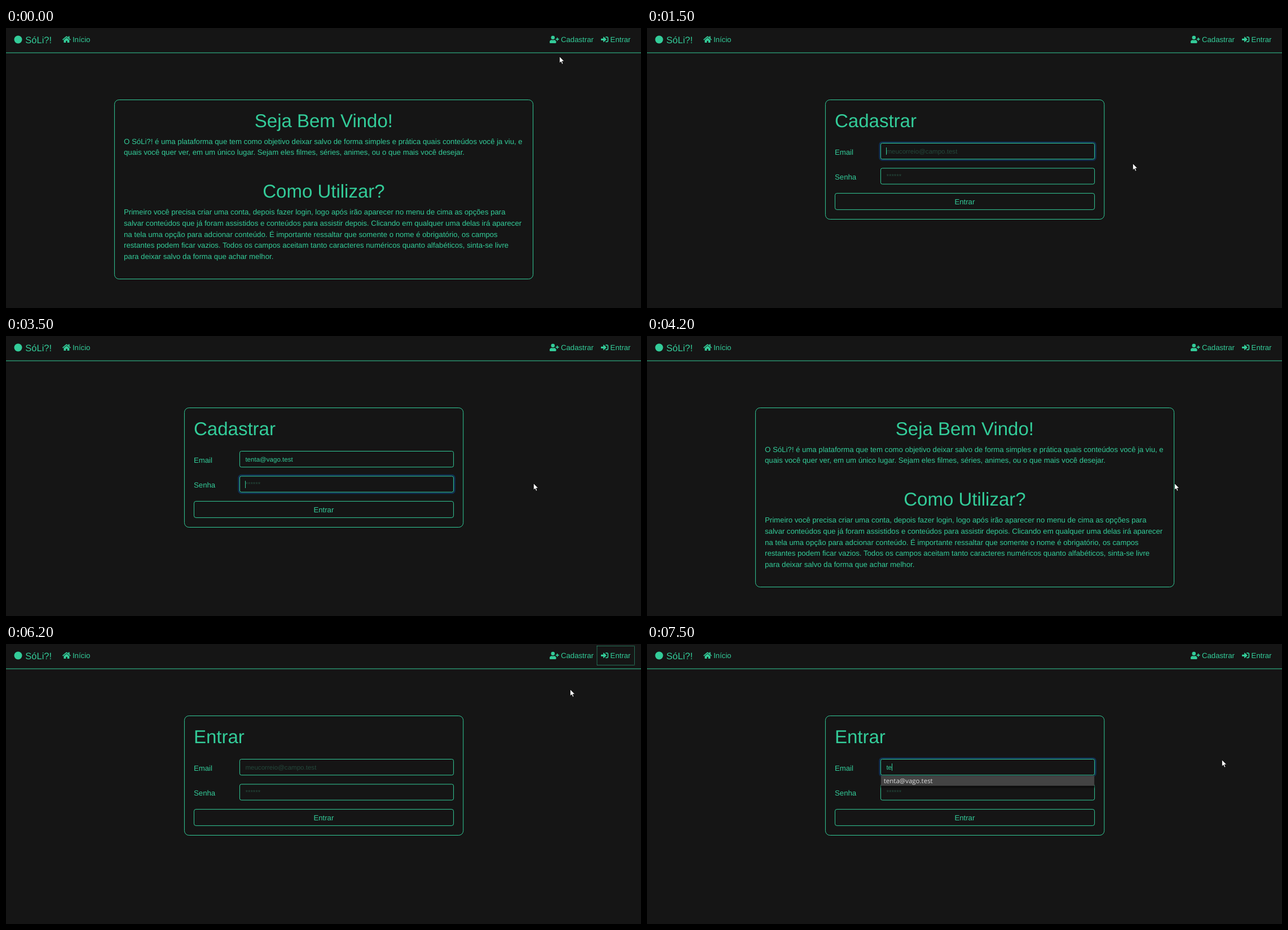
Recreate the animation shown at these times as an HTML page. Size 1126 by 497 pixels, loop 8 s.

```html
<!DOCTYPE html>
<html lang="pt-BR">
<head>
<meta charset="utf-8">
<title>SóLi?!</title>
<style>
  html, body { margin: 0; width: 100%; height: 100%; overflow: hidden; background: #151515; }
  svg { display: block; width: 1126px; height: 497px; }
  svg { font: 13.2px "Liberation Sans", Arial, sans-serif; text-rendering: geometricPrecision; }
  text { fill: #33cc99; white-space: pre; }
  .icon { fill: #33cc99; }
  .line { fill: none; stroke: #33cc99; stroke-width: 1; }
  .brand { font-size: 16.5px; }
  .h1 { font-size: 33px; }
  .mid { text-anchor: middle; }
  .field { font-size: 11.55px; }
  .hint { fill: #24483b; }
  .ui { font: 11.5px "Open Sans", "Noto Sans", sans-serif; }
  .glow { fill: none; stroke: rgb(0, 123, 255); stroke-opacity: .27; stroke-width: 2.6; }
  .caret { stroke: #33cc99; stroke-width: 1; }
  .dots { stroke-dasharray: 1 1; }
  .pointer { fill: #fff; stroke: #000; stroke-width: .8; stroke-linejoin: round; }
</style>
</head>
<body>
<svg viewBox="0 0 1126 497">
  <rect width="1126" height="497" fill="#151515"/>

  <g id="nav">
    <circle class="icon" cx="21.5" cy="20.5" r="7"/>
    <text class="brand" x="34.3" y="26.5">SóLi?!</text>
    <path class="icon" transform="translate(100 13.7) scale(.0258)" d="M280 148L96 300V464a16 16 0 0 0 16 16h112a16 16 0 0 0 16-16V368a16 16 0 0 1 16-16h64a16 16 0 0 1 16 16v96a16 16 0 0 0 16 16h112a16 16 0 0 0 16-16V300L296 148a12 12 0 0 0-16 0zM572 251L488 183V44a12 12 0 0 0-12-12h-56a12 12 0 0 0-12 12v73L318 43a48 48 0 0 0-61 0L4 251a12 12 0 0 0-1 17l25 31a12 12 0 0 0 17 2L280 107a12 12 0 0 1 16 0L531 301a12 12 0 0 0 17-2l25-31a12 12 0 0 0-1-17z"/>
    <text x="117.9" y="25.3">Início</text>
    <path class="icon" transform="translate(964 13.7) scale(.0258)" d="M624 208h-64v-64c0-9-7-16-16-16h-32c-9 0-16 7-16 16v64h-64c-9 0-16 7-16 16v32c0 9 7 16 16 16h64v64c0 9 7 16 16 16h32c9 0 16-7 16-16v-64h64c9 0 16-7 16-16v-32c0-9-7-16-16-16zM224 256a128 128 0 1 0 0-256a128 128 0 0 0 0 256zM314 288h-17c-46 21-100 21-146 0h-17C60 288 0 348 0 422V464c0 26 22 48 48 48h352c26 0 48-22 48-48v-42c0-74-60-134-134-134z"/>
    <text x="984" y="25.3">Cadastrar</text>
    <path class="icon" transform="translate(1055 13.7) scale(.0258)" d="M416 448h-84c-7 0-12-5-12-12v-40c0-7 5-12 12-12h84c18 0 32-14 32-32V160c0-18-14-32-32-32h-84c-7 0-12-5-12-12V76c0-7 5-12 12-12h84c53 0 96 43 96 96v192c0 53-43 96-96 96zM369 247L201 79c-15-15-41-5-41 17v96H24c-13 0-24 11-24 24v80c0 13 11 24 24 24h136v96c0 22 26 32 41 17l168-168c9-9 9-25 0-34z"/>
    <text x="1071.6" y="25.3">Entrar</text>
    <path class="line" d="M0 44H1126"/>
    <rect id="ringJoin" class="line dots" x="957.5" y="3.5" width="91" height="34"/>
    <rect id="ringLogin" class="line dots" x="1048" y="3.5" width="66.5" height="34"/>
  </g>

  <g id="home">
    <rect class="line" x="192.4" y="127.5" width="742.2" height="318" rx="8"/>
    <text class="h1 mid" x="563.4" y="176">Seja Bem Vindo!</text>
    <text class="h1 mid" x="563.4" y="301.4">Como Utilizar?</text>
  </g>

  <g id="form">
    <rect class="line" x="316.4" y="127.5" width="494.4" height="212" rx="8"/>
    <text id="title" class="h1" x="333" y="176"></text>
    <text x="333" y="224.5">Email</text>
    <text x="333" y="269.2">Senha</text>
    <rect id="glowMail" class="glow" x="412.6" y="202.7" width="382.8" height="31.8" rx="4.5"/>
    <rect id="glowPass" class="glow" x="412.6" y="247.1" width="382.8" height="31.8" rx="4.5"/>
    <rect class="line" x="414.4" y="204.5" width="379.2" height="28.2" rx="3"/>
    <rect class="line" x="414.4" y="248.9" width="379.2" height="28.2" rx="3"/>
    <rect class="line" x="333.4" y="293.4" width="460.2" height="29" rx="3.5"/>
    <text id="mail" class="field" x="424.4" y="222.8"></text>
    <text id="pass" class="field" x="424.4" y="267.4"></text>
    <path id="caret" class="caret" d="M0 0V13"/>
    <text class="mid" x="563.4" y="312.9">Entrar</text>
    <g id="list">
      <path d="M414 252H794V257H414Z" fill="url(#shade)"/>
      <rect x="414.5" y="233.5" width="379" height="18.5" fill="#262626"/>
      <rect id="row" x="415" y="234" width="378" height="17.4"/>
      <text id="rowText" class="ui" x="419.8" y="247">tenta@vago.test</text>
    </g>
  </g>

  <g id="toast">
    <rect class="line" x="877" y="61.5" width="233.6" height="29" rx="3.5"/>
    <text x="881.3" y="81.2">Cadastro realizado com sucesso</text>
    <circle class="line" cx="1100" cy="77" r="5.7" style="stroke-width:.9"/>
    <text class="mid" x="1100" y="79.5" font-size="8.5">x</text>
  </g>

  <g id="status">
    <path d="M0 481H128q3 0 3 3V497H0Z" fill="#3d3d3d"/>
    <text id="link" class="ui" x="4" y="493" style="fill:#ddd;font-size:10.5px"></text>
  </g>

  <g id="pointer" class="pointer">
    <path id="arrow" d="M.4 .4V12.3L3.1 9.8L5 14.2L7 13.3L5.1 9.1H8.8Z"/>
    <path id="hand" d="M4 1.4Q5 -.2 6.1 1.4V5L11.6 6.2Q12.7 6.5 12.5 7.7L11.6 12.6H5.2L1 8.4Q1.6 6.6 4 8Z"/>
    <path id="beam" d="M.5 .5H2.6L3.2 1L3.8 .5H6V1.9H4V12.1H6V13.5H3.8L3.2 13L2.6 13.5H.5V12.1H2.4V1.9H.5Z"/>
  </g>

  <defs>
    <linearGradient id="shade" x2="0" y2="1">
      <stop stop-color="#000" stop-opacity=".6"/>
      <stop offset="1" stop-color="#000" stop-opacity="0"/>
    </linearGradient>
  </defs>
</svg>

<script>
const $ = id => document.getElementById(id);
const LOOP = 8000, STEP = 100;
const MAIL = "tenta@vago.test", MAIL_HINT = "meucorreio@campo.test";

const paragraphs = [
  [205.5, [
    "O SóLi?! é uma plataforma que tem como objetivo deixar salvo de forma simples e prática quais conteúdos você ja viu, e",
    "quais você quer ver, em um único lugar. Sejam eles filmes, séries, animes, ou o que mais você desejar."]],
  [331, [
    "Primeiro você precisa criar uma conta, depois fazer login, logo após irão aparecer no menu de cima as opções para",
    "salvar conteúdos que já foram assistidos e conteúdos para assistir depois. Clicando em qualquer uma delas irá aparecer",
    "na tela uma opção para adcionar conteúdo. É importante ressaltar que somente o nome é obrigatório, os campos",
    "restantes podem ficar vazios. Todos os campos aceitam tanto caracteres numéricos quanto alfabéticos, sinta-se livre",
    "para deixar salvo da forma que achar melhor."]]
];

for (const [top, lines] of paragraphs) lines.forEach((line, i) => {
  const el = document.createElementNS("http://www.w3.org/2000/svg", "text");
  el.setAttribute("x", 209);
  el.setAttribute("y", top + i * 19.8);
  el.textContent = line;
  $("home").append(el);
});

// Each table row: start time, then the value held from there on.
const path = [
  [0, 981, 50, "arrow"], [100, 1010, 40, "arrow"], [300, 1011, 30, "hand"], [400, 1010, 23, "hand"],
  [700, 985, 48, "arrow"], [800, 930, 100, "arrow"], [900, 850, 160, "arrow"], [1000, 770, 200, "arrow"],
  [1100, 700, 212, "beam"], [1500, 861, 240, "arrow"], [1600, 905, 254, "arrow"], [1700, 928, 260, "arrow"],
  [1800, 935, 261, "arrow"], [4600, 946, 235, "arrow"], [4700, 970, 180, "arrow"], [4800, 990, 132, "arrow"],
  [4900, 997, 116, "arrow"], [5200, 994, 106, "arrow"], [5300, 988, 93, "arrow"], [5400, 982, 83, "hand"],
  [5600, 987, 83, "arrow"], [5700, 1030, 56, "arrow"], [5800, 1072, 28, "hand"], [5900, 1082, 21, "hand"],
  [6200, 1000, 80, "arrow"], [6300, 830, 160, "arrow"], [6400, 685, 200, "arrow"], [6500, 676, 197, "arrow"],
  [6600, 666, 195, "arrow"], [6700, 654, 202, "arrow"], [6800, 644, 207, "beam"], [7100, 780, 214, "arrow"],
  [7200, 960, 208, "arrow"], [7300, 1019, 205, "arrow"]
];
const pages = [[0, ""], [600, "Cadastrar"], [4200, ""], [6100, "Entrar"]];
const typed = [[0, 0], [1700, 1], [1800, 2], [3100, MAIL.length], [4200, 0], [7300, 1], [7500, 2]];
const secret = [[0, 0], [3600, 1], [3800, 2], [4000, 3], [4200, 0]];

const held = (table, t) => table.findLast(row => row[0] <= t);
const within = (t, a, b) => t >= a && t < b;
const show = (id, on) => $(id).style.display = on ? "" : "none";
const fade = (t, start) => Math.min(1, (t - start + 50) / 150);

function fill(id, text, hint) {
  $(id).textContent = text || hint;
  $(id).classList.toggle("hint", !text);
}

function draw(t) {
  const page = held(pages, t)[1];
  show("home", !page);
  show("form", page);
  $("title").textContent = page;

  show("ringJoin", within(t, 500, 1400));
  show("ringLogin", within(t, 6000, 7000));
  show("toast", within(t, 4300, 5600));

  const join = within(t, 300, 700), login = within(t, 5800, 6200);
  show("status", join || login);
  $("link").textContent = "localhost:5000/" + (join ? "cadastrar" : "entrar");

  const mail = MAIL.slice(0, held(typed, t)[1]);
  const pass = "•".repeat(held(secret, t)[1]);
  fill("mail", mail, MAIL_HINT);
  fill("pass", pass, "******");

  const onPass = within(t, 3300, 4200);
  const onMail = within(t, 1400, 3300) || t >= 7000;
  show("glowMail", onMail);
  show("glowPass", onPass);
  $("glowMail").style.opacity = fade(t, t < 7000 ? 1400 : 7000);
  $("glowPass").style.opacity = fade(t, 3300);

  const picked = within(t, 2700, 3100);
  show("list", within(t, 1700, 3100) || t >= 7300);
  $("row").setAttribute("fill", picked ? "#90a878" : "#434343");
  $("rowText").style.fill = picked ? "#fff" : "#ddd";

  show("caret", (onMail || onPass) && !picked);
  const text = onPass ? pass : mail;
  const width = text ? $(onPass ? "pass" : "mail").getComputedTextLength() : 0;
  $("caret").setAttribute("transform", `translate(${Math.floor(424.5 + width) + .5} ${onPass ? 257 : 212})`);

  const [, x, y, shape] = held(path, t);
  $("pointer").setAttribute("transform", `translate(${x} ${y})`);
  for (const id of ["arrow", "hand", "beam"]) show(id, id === shape);
}

const start = performance.now();
function loop() {
  const t = (performance.now() - start) % LOOP;
  draw(Math.floor(t / STEP) * STEP);
  requestAnimationFrame(loop);
}
loop();
</script>
</body>
</html>
```
